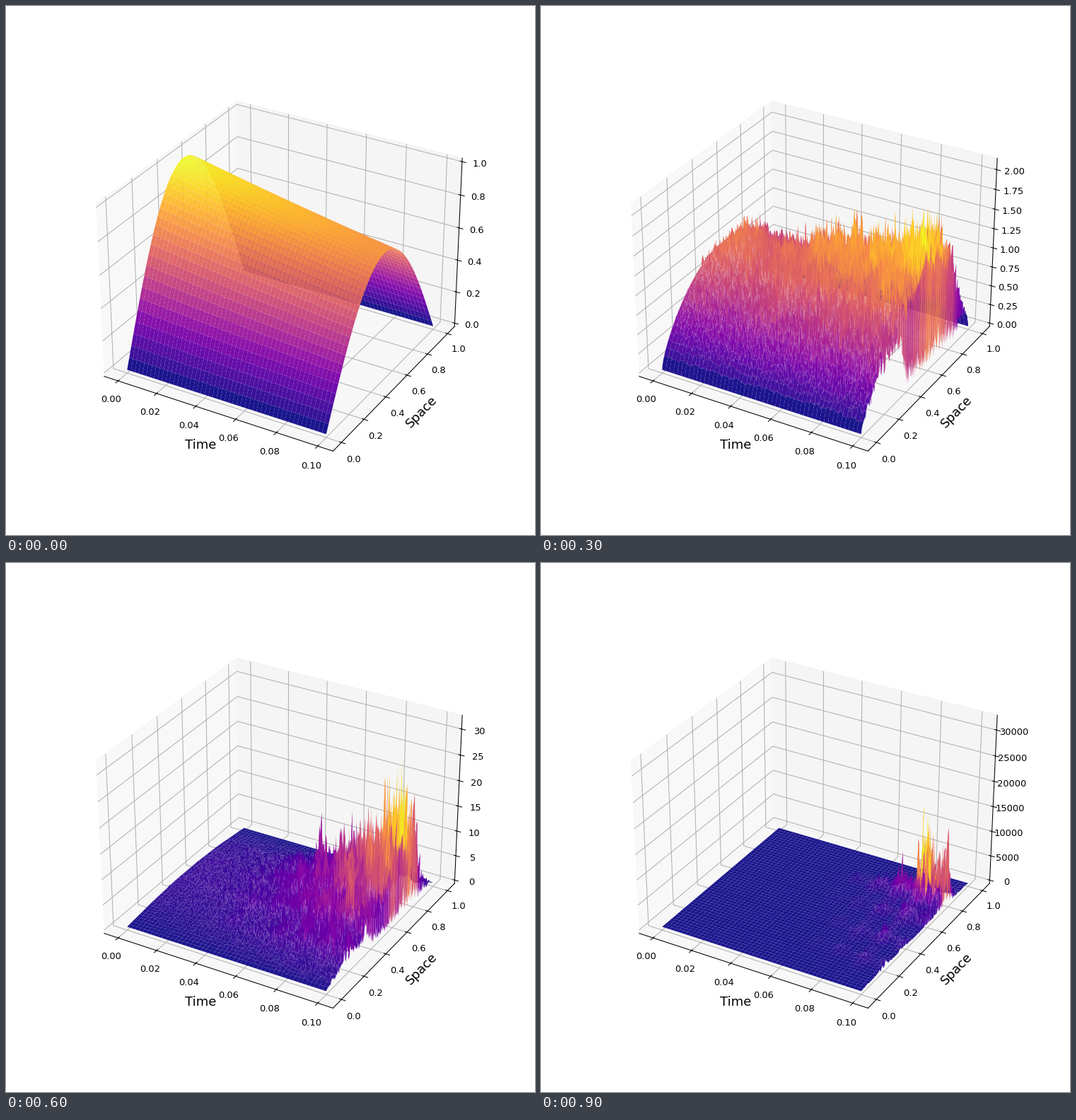
These frames come from a looping animation (748 by 748 pixels, 1 s). A matplotlib script:

```python
import numpy as np
import matplotlib.pyplot as plt
from matplotlib.animation import FuncAnimation

# Heat equation with multiplicative noise, one noise level per frame.
FRAMES = 10
T_MAX = 0.1
NX, NT = 401, 301
X_STRIDE, T_STRIDE = 8, 6
DECAY = 0.27

tau, space = np.meshgrid(np.linspace(0, 1, NT), np.linspace(0, 1, NX))
rng = np.random.default_rng(7)


def bell(v, center, width):
    return np.exp(-((v - center) / width) ** 2)


def wave(v, crest, period):
    return np.cos(2 * np.pi * (v - crest) / period)


def ramp(v, start, end):
    return np.clip((v - start) / (end - start), 0, 1)


def rough_field():
    white = rng.normal(size=(NX, NT))
    k = np.hypot(np.fft.fftfreq(NX)[:, None], np.fft.fftfreq(NT))
    field = np.fft.ifft2(np.fft.fft2(white) / np.hypot(k, 0.03)).real
    return field / field.std()


base = np.sin(np.pi * space) * np.exp(-DECAY * tau)

# Log amplitude: a gentle swell along time, and ridges that grow with the noise.
swell = np.interp(tau, [0, 0.07, 0.24, 0.47, 0.7, 1],
                  [0, 0.2, -0.06, 0.36, 0.52, 0.88]) * bell(space, 0.72, 0.3)
ridges = bell(tau, 1, 0.65) * (
    0.62 + 0.24 * bell(space, 0.78, 0.12)
    + 0.07 * wave(tau, 0.89, 0.12) + 0.07 * wave(space, 0.78, 0.19))
rough = rough_field() * tau ** 0.2

# The last profile falls off into a ragged fringe over most of the space axis.
edge = space[:, -1]
fringe = ramp(edge, 0.30, 0.40) * ramp(edge, 0.97, 0.88)
fringe_scale = 1 - fringe * (1 - rng.uniform(0.03, 0.27, NX))


def log_peak(level):
    if level == 0:
        return 0.0
    return 0.557 + 0.0925 * (level - 1) + 0.3056 * max(level - 3, 0) ** 1.893


def solution(level):
    if level == 0:
        return base
    growth = log_peak(level) - log_peak(1)
    u = base * np.exp(swell + growth * ridges + (0.05 + 0.045 * level) * rough)
    u **= log_peak(level) / np.log(u.max())
    u[:, -1] *= fringe_scale
    return u


fig = plt.figure(figsize=(8, 8), dpi=93.5)
ax = fig.add_subplot(projection="3d")
ax.set_xlabel("Time", fontsize=14)
ax.set_ylabel("Space", fontsize=14)
for axis, gray in ((ax.xaxis, 0.95), (ax.yaxis, 0.93), (ax.zaxis, 0.945)):
    axis.set_pane_color((gray, gray, gray, 0.5))
surfaces = []


def padded(length, pad):
    return -pad * length, (1 + pad) * length


def draw(level):
    while surfaces:
        surfaces.pop().remove()
    surfaces.append(ax.plot_surface(
        tau * T_MAX, space, solution(level), cmap="plasma", alpha=0.95,
        rstride=X_STRIDE, cstride=T_STRIDE))
    side = 0.05 + 1.1 / 48
    ax.set_xlim(*padded(T_MAX, side))
    ax.set_ylim(*padded(1, side))
    ax.set_zlim(*padded(np.exp(log_peak(level)), 1 / 48))
    return surfaces


anim = FuncAnimation(fig, draw, frames=FRAMES, init_func=lambda: draw(0),
                     interval=1000 // FRAMES, repeat=True, blit=False)
plt.show()
```
